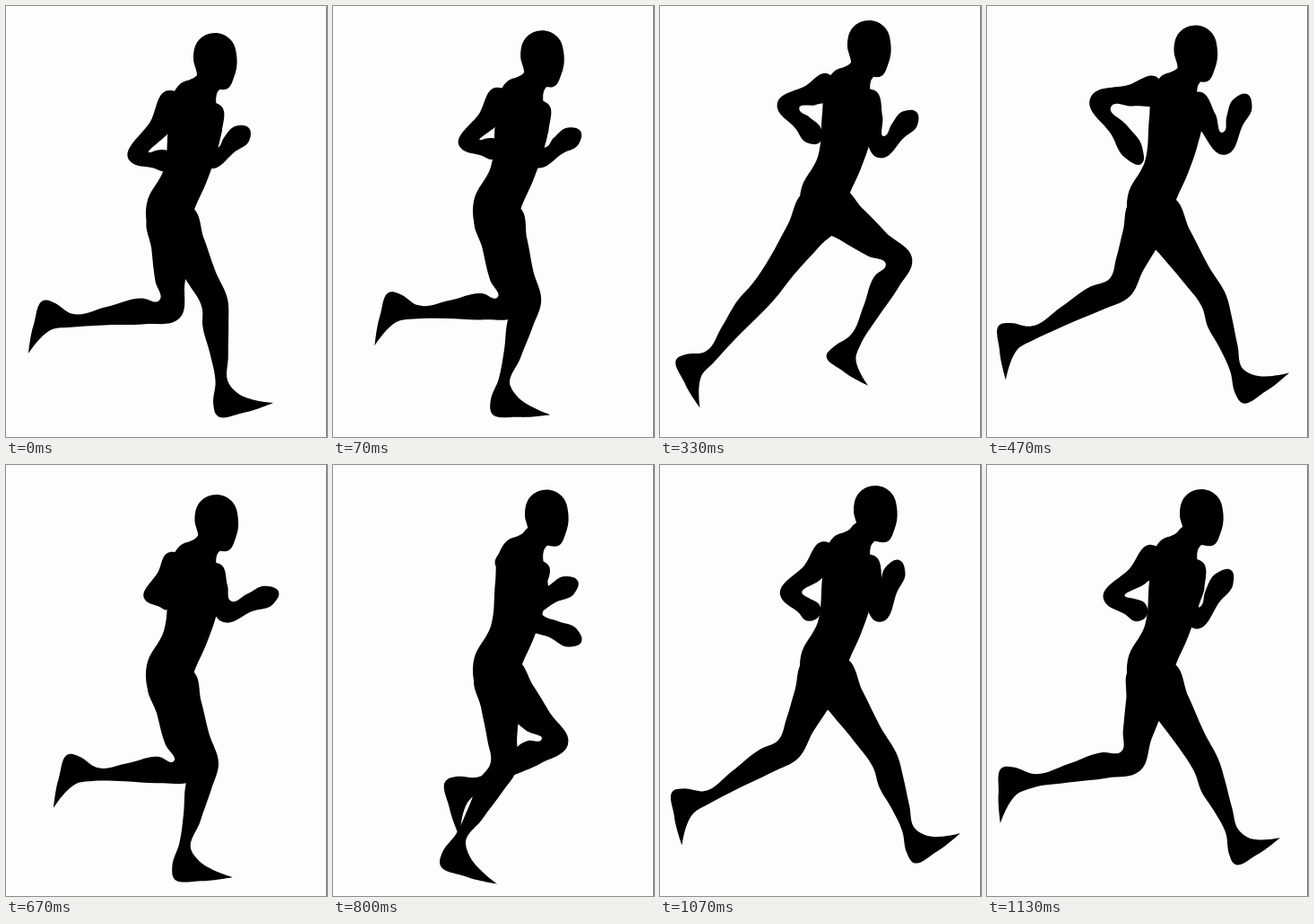
Write an HTML page that moves like this. It is 358 px wide and 480 px high and loops after 1.19 s.

```html
<!DOCTYPE html>
<html lang="en">
<head>
<meta charset="utf-8">
<title>Runner</title>
<style>
html, body { margin: 0; width: 100%; height: 100%; overflow: hidden; background: #fdfcfe; }
svg { display: block; width: 358px; height: 480px; }
</style>
</head>
<body>
<svg id="stage" viewBox="0 0 358 480"><rect x="357" width="1" height="480" fill="#777"/></svg>
<script>
const LOOP = 1190, STEPS = 18;
const HIP = [184, 205], BACK_SHOULDER = [193, 71], FRONT_SHOULDER = [226, 82];
const FAR_LAG = 8.7; // the far leg repeats the near one this many steps apart

const points = s => s.split(' ').map(w => w.split(',').map(Number));
const rows = t => Object.fromEntries(Object.entries(t).map(([k, s]) => [k, points(s)]));

// Shapes shared by all poses, measured from the top of the head.
const skull = points('-20,58 -20,46 -24,28 -18,8 0,0 17,7 24.5,28 21,50 14,62 0,62');
const torso = points('218,42 211,49 194,57 185,71 181,103 176,152 157,190 156,203 162,225 184,240 203,225 209,200 224,165 235,133 240,108 235,84 235,68 243,55');

// Limb outlines: bone, share of its length, distance to the front (+) or back (-).
const legShape = [
  [0, 0, 25], [0, .35, 22], [0, .7, 17], [0, 1, 15], [1, .25, 13], [1, .65, 9], [1, 1, 7],
  [2, .3, -3], [2, 1, 0], [2, .55, -21], [2, .05, -33], [2, -.04, -25],
  [1, .95, -8], [1, .6, -11], [1, .25, -16], [0, 1, -15], [0, .7, -16], [0, .35, -21], [0, 0, -25]
];
const armSide = [[0, 0, 13], [0, .5, 12], [0, 1, 12.5], [1, .45, 10], [1, .82, 11]];
const armShape = [...armSide, [1, 1, 0], ...armSide.map(([b, t, w]) => [b, t, -w]).reverse()];
const TOE = 8;

// Knee, ankle and toe from the hip, by phase of the stride.
const stride = rows({
  0: '49,97 58,187 114,207',
  .7: '38,96 16,190 69,221',
  2.7: '6,104 -42,186 -1,234',
  3: '-11,102 -56,178 -37,233',
  4.7: '-74,99 -130,178 -136,232',
  7: '-36,87 -137,140 -163,190',
  7.7: '-24,98 -136,121 -169,167',
  8.7: '-2,103 -116,116 -159,152',
  10: '14,102 -88,107 -131,144',
  11.9: '62,77 -27,123 -48,181',
  14: '86,62 43,159 64,205',
  15.7: '70,104 96,181 153,182',
  17: '62,106 91,178 143,183'
});

// Top of the head, back elbow and hand, front elbow and hand.
const upper = rows({
  0: '233,30 150,168 186,174 232,169 271,136',
  3: '233.5,22 161,124 188,137 230,168 286,146',
  5: '233,16 143,112 178,152 248,157 286,118',
  7: '232.5,21.5 127,107 172,176 265,153 290,98',
  10: '234.5,33 167,146 185,152 246,163 304,141',
  12: '238,27.5 222,155 273,129 222,172 277,197',
  14: '242,15 155,138 174,172 268,147 257,84',
  17: '239,27 143,149 178,168 235,170 272,117'
});

const add = (p, q) => [p[0] + q[0], p[1] + q[1]];
const sub = (p, q) => [p[0] - q[0], p[1] - q[1]];
const scale = (p, k) => [p[0] * k, p[1] * k];
const mix = (p, q, u) => add(p, scale(sub(q, p), u));
const unit = p => scale(p, 1 / (Math.hypot(...p) || 1));

function at(keys, time) {
  const t = time % STEPS, ks = Object.keys(keys).map(Number).sort((a, b) => a - b);
  const a = ks.filter(k => k <= t).pop(), b = ks.find(k => k > t) ?? STEPS;
  return keys[a].map((p, i) => mix(p, keys[b % STEPS][i], (t - a) / (b - a)));
}

// Wraps a limb outline round its joints; the middle joint bends along the bisector.
function limb(joints, shape) {
  const normal = b => {
    const [x, y] = unit(sub(joints[b + 1], joints[b]));
    return [y, -x];
  };
  return shape.map(([b, t, w]) => {
    const n = b === 0 && t === 1 ? unit(add(normal(0), normal(1))) : normal(b);
    return add(mix(joints[b], joints[b + 1], t), scale(n, w));
  });
}

// Closed smooth curve; the point with index `sharp` stays a corner.
function curve(p, sharp) {
  const n = p.length, next = i => p[(i + 1) % n];
  const dirs = p.map((v, i) => {
    if (i === sharp) return [0, 0];
    const a = sub(v, p[(i + n - 1) % n]), b = sub(next(i), v);
    return unit(add(scale(unit(a), Math.hypot(...b)), scale(unit(b), Math.hypot(...a))));
  });
  const show = v => v[0].toFixed(1) + ' ' + v[1].toFixed(1);
  return 'M' + show(p[0]) + p.map((v, i) => {
    const w = next(i), h = Math.hypot(...sub(w, v)) * .35;
    const c = add(v, scale(dirs[i], h)), e = sub(w, scale(dirs[(i + 1) % n], h));
    return 'C' + [c, e, w].map(show).join(' ');
  }).join('') + 'Z';
}

function pose(step) {
  const [top, ...arms] = at(upper, step);
  const drop = p => add(p, [0, top[1]]);
  const hip = drop(HIP);
  const leg = phase => limb([hip, ...at(stride, phase).map(p => add(p, hip))], legShape);
  return [
    curve(skull.map(p => add(p, top))),
    curve(torso.map(drop)),
    curve(limb([drop(BACK_SHOULDER), arms[0], arms[1]], armShape)),
    curve(limb([drop(FRONT_SHOULDER), arms[2], arms[3]], armShape)),
    curve(leg(step), TOE),
    curve(leg(step + FAR_LAG), TOE)
  ];
}

const poses = Array.from({ length: STEPS }, (_, i) => pose(i));
const starts = poses.map((_, i) => Math.round(i * 20 / 3) * 10);
const stage = document.getElementById('stage');
const parts = poses[0].map(() =>
  stage.appendChild(document.createElementNS('http://www.w3.org/2000/svg', 'path')));

const begin = performance.now();
let shown = -1;
function draw() {
  const t = (performance.now() - begin) % LOOP;
  const step = starts.filter(s => s <= t).length - 1;
  if (step !== shown) {
    parts.forEach((el, i) => el.setAttribute('d', poses[step][i]));
    shown = step;
  }
  requestAnimationFrame(draw);
}
draw();
</script>
</body>
</html>
```
